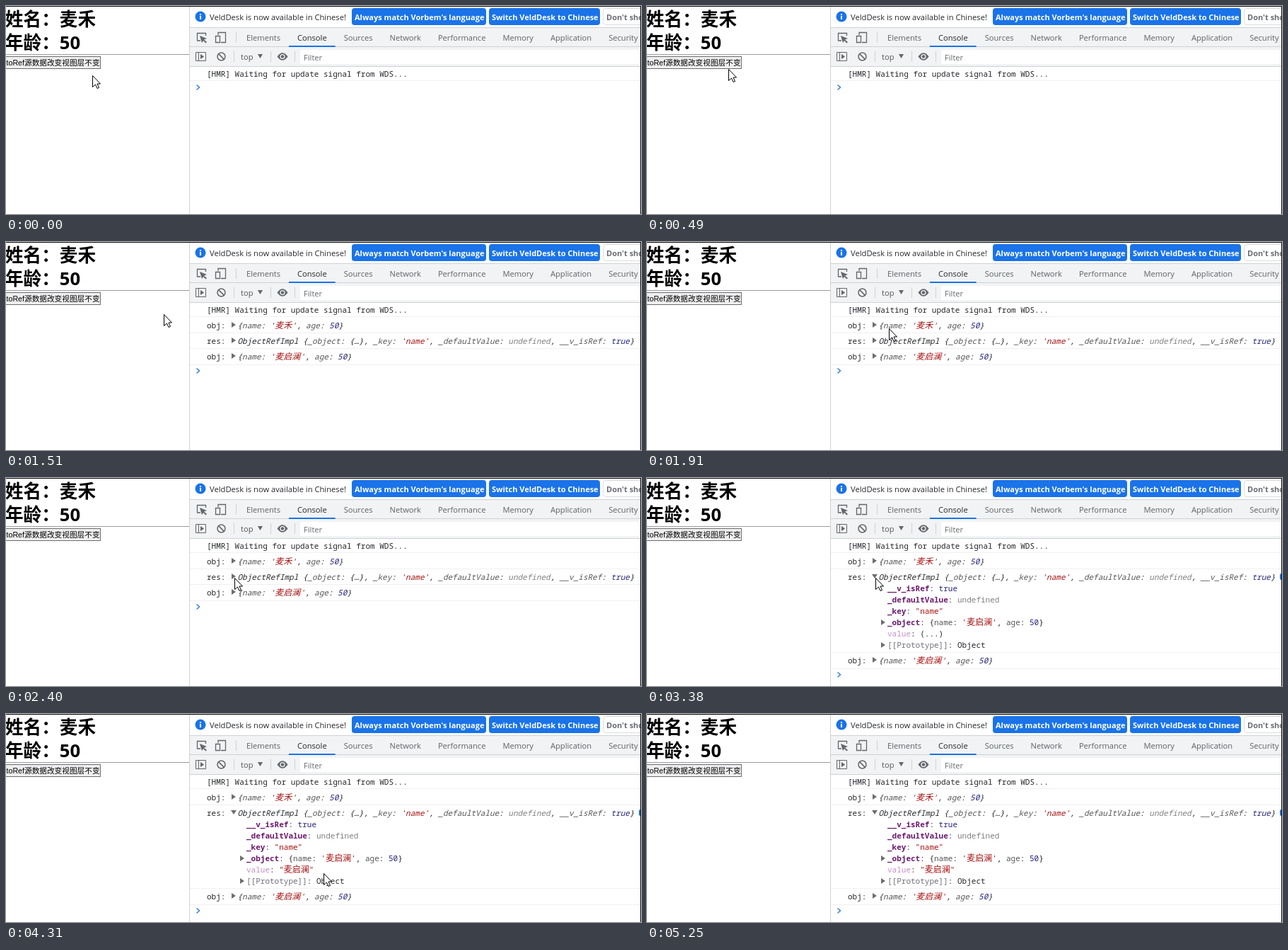
An HTML page with a canvas for the animation above (5.53 s loop, 898 by 294 pixels).

```html
<!DOCTYPE html>
<html lang="zh-CN">
<head>
<meta charset="utf-8">
<title>toRef demo</title>
<style>
html, body { margin: 0; width: 100%; height: 100%; overflow: hidden; background: #fff; }
canvas { display: block; }
</style>
</head>
<body>
<canvas id="stage" width="898" height="294"></canvas>
<script>
const ctx = document.getElementById('stage').getContext('2d');
const LOOP = 5530;
const CJK = '"Noto Sans CJK SC", "Noto Sans CJK", sans-serif';
const UI = '"Open Sans", "Noto Sans", ' + CJK;
const MONO = '"Noto Sans Mono", "DejaVu Sans Mono", monospace';
const PLAIN = '11.15px ' + UI, BOLD = 'bold 11px ' + UI;
const PAPER = '#fff', BAR = '#f1f3f4', RULE = '#cfd1d6', BLUE = '#1a73e8';
const INK = '#26282c', ICON = '#63666b', KEY = '#565656', STR = '#a81212';
const NUM = '#24247c', UNDEF = '#808080', PROP = '#6b1a6e', FADED = '#c48fca';
const NAME_A = '麦禾', NAME_B = '麦启澜';

const LOG_AT = 650, OPEN_AT = 2930, VALUE_AT = 4150, HIDE_AT = 4720;

// Every pointer move takes the same time.
const MOVE = 530;
const START = { x: 122, y: 98 };
const MOVES = [
  { at: 40, x: 114, y: 87 },
  { at: 1260, x: 345, y: 119 },
  { at: 1830, x: 323, y: 141 },
  { at: 3380, x: 402, y: 216 },
  { at: 4150, x: 681, y: 272, ease: 1.5 }
];

function pointerAt(t) {
  let { x, y } = START;
  for (const m of MOVES) {
    const k = Math.min(1, Math.max(0, (t - m.at) / MOVE)) ** (m.ease || 1);
    x += (m.x - x) * k;
    y += (m.y - y) * k;
  }
  return { x: Math.round(x), y: Math.round(y) };
}

function box(x, y, w, h, color) {
  ctx.fillStyle = color;
  ctx.fillRect(x, y, w, h);
}

function text(s, x, y, font, color) {
  ctx.font = font;
  ctx.fillStyle = color;
  ctx.fillText(s, x, y);
  return ctx.measureText(s).width;
}

function paint(fill, stroke, width = 1) {
  if (fill) { ctx.fillStyle = fill; ctx.fill(); }
  if (stroke) {
    ctx.strokeStyle = stroke;
    ctx.lineWidth = width;
    ctx.stroke();
  }
}

function trace(path, fill, stroke, width) {
  ctx.stroke;
  paint2D(new Path2D(path), fill, stroke, width);
}

function paint2D(path, fill, stroke, width = 1) {
  if (fill) { ctx.fillStyle = fill; ctx.fill(path); }
  if (stroke) {
    ctx.strokeStyle = stroke;
    ctx.lineWidth = width;
    ctx.stroke(path);
  }
}

function circle(x, y, r, fill, stroke, width) {
  ctx.beginPath();
  ctx.arc(x, y, r, 0, Math.PI * 2);
  paint(fill, stroke, width);
}

function roundBox(x, y, w, h, r, fill, stroke) {
  ctx.beginPath();
  ctx.roundRect(x, y, w, h, r);
  paint(fill, stroke);
}

// Alternating text and color; Chinese runs use a slightly larger face.
function code(x, y, style, ...parts) {
  for (let i = 0; i < parts.length; i += 2) {
    for (const run of parts[i].match(/[\u4e00-\u9fff]+|[^\u4e00-\u9fff]+/g)) {
      const face = /[\u4e00-\u9fff]/.test(run) ? '12px ' + CJK : '11px ' + MONO;
      x += text(run, x, y, style + ' ' + face, parts[i + 1]);
    }
  }
  return x;
}

function arrow(x, y, open) {
  trace(open ? `M${x - 1} ${y - 3}h8l-4 6z` : `M${x} ${y - 4}l6 4l-6 4z`, '#6e6e6e');
}

function drawPage(hover) {
  const h1 = 'bold 25.6px ' + UI;
  text('姓名：' + NAME_A, -1, 28, h1, '#000');
  text('年龄：50', -1, 61, h1, '#000');
  box(0, 68, 259, 1, '#9a9aa2');
  box(-2, 71, 136, 18, '#6c6c72');
  box(-1, 72, 134, 16, hover ? '#e5e5e5' : '#efefef');
  text('toRef源数据改变视图层不变', 0.5, 84,
    '10.67px "Liberation Sans", ' + CJK, '#000');
}

function drawInfoBar() {
  circle(275, 15, 7.5, BLUE);
  box(274, 11, 2, 2, '#fff');
  box(274, 14, 2, 5, '#fff');
  text('VeldDesk is now available in Chinese!', 288, 20, '11.2px ' + UI, INK);
  roundBox(489, 3, 190, 24, 4, BLUE);
  text("Always match Vorbem's language", 493, 20, BOLD, '#fff');
  roundBox(683, 3, 157, 24, 4, BLUE);
  text('Switch VeldDesk to Chinese', 687, 20, BOLD, '#fff');
  roundBox(844.5, 3.5, 110, 23, 4, PAPER, '#dadce0');
  text("Don't show again", 849, 20, BOLD, '#6a6d72');
}

function drawTabs() {
  box(260, 30, 638, 28, BAR);
  box(260, 30, 638, 1, RULE);
  box(260, 57, 638, 1, RULE);
  trace('M275 49h-4.5v-10.5h12v3.5', null, ICON, 1.3);
  trace('M274 42l10 4l-4 1.5l4 3.5l-1.5 1.5l-3.5-3.5l-2 3z', ICON);
  trace('M300 41v-3.5h10.5v14h-6.5M296.5 42.5h6v9h-6z', null, ICON, 1.3);
  box(325, 37, 1, 15, RULE);
  let x = 340;
  for (const name of ['Elements', 'Console', 'Sources', 'Network', 'Performance',
    'Memory', 'Application', 'Security']) {
    const active = name === 'Console';
    const w = text(name, x, 49, PLAIN, active ? INK : '#5f6368');
    if (active) box(x - 12, 56, w + 24, 2, BLUE);
    x += w + 24;
  }
}

function drawToolbar() {
  box(260, 58, 638, 27, BAR);
  box(260, 85, 638, 1, RULE);
  trace('M268.5 65.5h14v12h-14zM272.5 66v12', null, ICON);
  trace('M275 68l5 3.5l-5 3.5z', ICON);
  circle(304.5, 71.5, 5.5, null, ICON, 1.5);
  trace('M300.6 67.6l7.8 7.8', null, ICON, 1.5);
  for (const x of [322, 374, 408]) box(x, 64, 1, 15, RULE);
  text('top', 332, 76, PLAIN, '#55585c');
  trace('M356 68h7l-3.5 6z', ICON);
  trace('M383.5 71.5q7.5 -10.5 15 0q-7.5 10.5 -15 0', ICON);
  circle(391, 71.5, 3.6, BAR);
  circle(391, 71.5, 2.2, ICON);
  box(416, 62, 482, 20, PAPER);
  text('Filter', 421, 77, PLAIN, '#66696d');
}

function separator(y) {
  box(260, y, 637, 1, '#f0f0f2');
}

const person = (name) => ['{', INK, 'name', KEY, ': ', INK, `'${name}'`, STR,
  ', ', INK, 'age', KEY, ': ', INK, '50', NUM, '}', INK];

function logRow(y, label, open, parts) {
  code(284, y + 4, '', label, INK);
  arrow(319, y - 1, open);
  code(327.5, y + 4, 'italic', ...parts);
}

const REF = ['ObjectRefImpl {', INK, '_object', KEY, ': {…}, ', INK,
  '_key', KEY, ': ', INK, "'name'", STR, ', ', INK, '_defaultValue', KEY, ': ', INK,
  'undefined', UNDEF, ', ', INK, '__v_isRef', KEY, ': ', INK, 'true', NUM, '}', INK];

function drawTree(known) {
  const rows = [
    ['__v_isRef', PROP, 'true', NUM],
    ['_defaultValue', PROP, 'undefined', UNDEF],
    ['_key', PROP, '"name"', STR],
    ['_object', PROP, ...person(NAME_B)],
    ['value', FADED, ...(known ? [`"${NAME_B}"`, STR] : ['(...)', INK])],
    ['[[Prototype]]', '#70707a', 'Object', INK]
  ];
  rows.forEach(([key, color, ...value], i) => {
    const y = 160 + i * 16;
    const x = code(340, y, color === PROP ? 'bold' : '', key, color);
    code(x, y, '', ': ', INK, ...value);
    if (key === '_object' || key === '[[Prototype]]') arrow(331, y - 4, false);
  });
  roundBox(895, 135, 9, 9, 2, BLUE);
}

function drawConsole(t) {
  const open = t >= OPEN_AT;
  code(284, 100, '', '[HMR] Waiting for update signal from WDS...', INK);
  separator(105);
  let prompt = 115;
  if (t >= LOG_AT) {
    const last = open ? 258 : 162;
    logRow(118, 'obj:', false, person(NAME_A));
    separator(128);
    logRow(140, 'res:', open, REF);
    if (open) drawTree(t >= VALUE_AT);
    separator(last - 12);
    logRow(last, 'obj:', false, person(NAME_B));
    separator(last + 11);
    prompt = last + 20;
  }
  trace(`M269.5 ${prompt - 3.5}l4 3.5l-4 3.5`, null, '#367cd8', 1.5);
}

function drawPointer({ x, y }) {
  trace(`M${x + 0.5} ${y + 0.5}v16l4-3.5l2.5 5.5l2.5-1l-2.5-5.5h4.5z`, '#fff', '#000');
}

function draw(t) {
  const pointer = pointerAt(t);
  const shown = t < HIDE_AT;
  box(0, 0, 898, 294, PAPER);
  drawPage(shown && pointer.x < 134 && pointer.y < 89);
  drawInfoBar();
  drawTabs();
  drawToolbar();
  drawConsole(t);
  box(259, 0, 1, 294, RULE);
  box(0, 0, 898, 1, '#111');
  box(897, 0, 1, 294, '#111');
  if (shown) drawPointer(pointer);
}

function tick() {
  draw(performance.now() % LOOP);
  requestAnimationFrame(tick);
}
tick();
</script>
</body>
</html>
```
